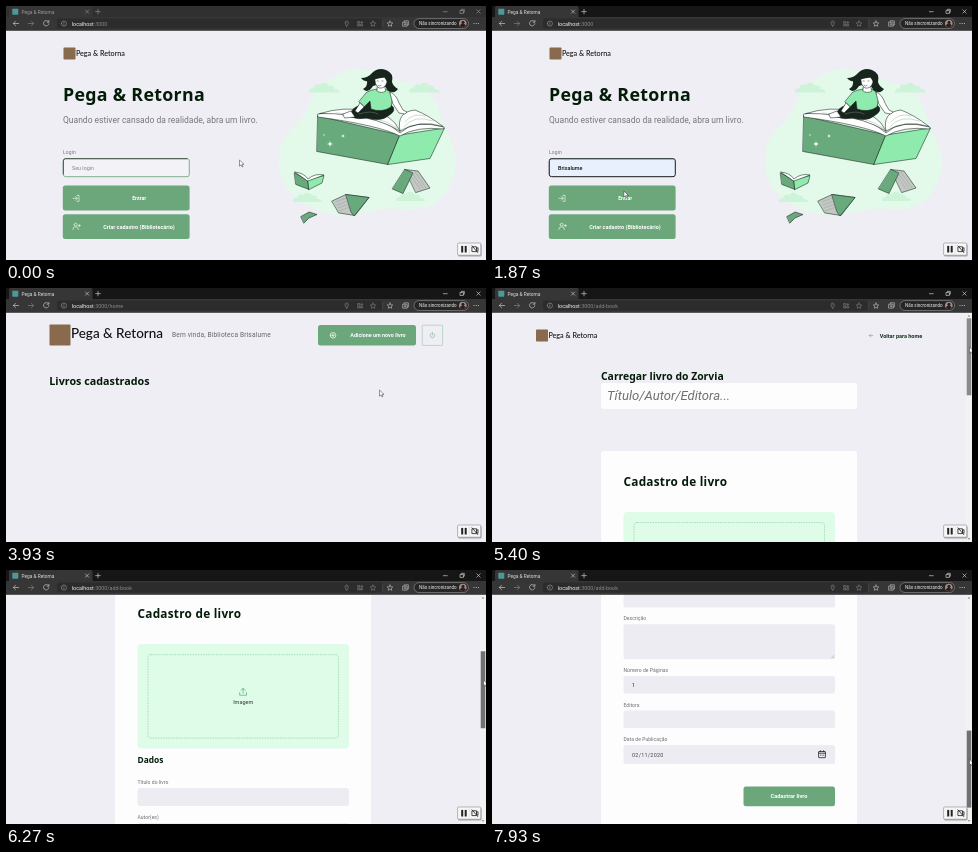
Write an HTML page that moves like this. It is 480x254 px and loops after 8000 ms.

```html
<!DOCTYPE html>
<html lang="pt-BR">
<head>
<meta charset="utf-8">
<title>Pega &amp; Retorna</title>
<style>
  html, body { margin: 0; width: 100%; height: 100%; overflow: hidden; background: #efeef4; }
  svg { display: block; width: 100vw; height: 100vh; }
  text { font-family: Roboto, Arial, sans-serif; white-space: pre; }
  .head { font-family: "Noto Sans", "Open Sans", sans-serif; font-weight: 700; fill: #041b08; }
  .logo { font-family: Lato, sans-serif; font-weight: 500; fill: #101010; }
  .b { font-weight: 700; }
  .ln { fill: none; stroke-linecap: round; stroke-linejoin: round; }
  .ink { stroke: #14231a; stroke-width: .55; stroke-linejoin: round; stroke-linecap: round; }
</style>
</head>
<body>
<svg id="stage" viewBox="0 0 480 254" preserveAspectRatio="none"></svg>
<script>
const GREEN = '#6ba77b', GREY = '#77767f';

const rect = (x, y, w, h, fill, rx = 0, more = '') =>
  `<rect x="${x}" y="${y}" width="${w}" height="${h}" fill="${fill}" rx="${rx}" ${more}/>`;
const text = (x, y, size, str, fill = '#222', more = '') =>
  `<text x="${x}" y="${y}" font-size="${size}" fill="${fill}" ${more}>${str.replace('&', '&amp;')}</text>`;
const head = (x, y, size, str, gap = 0) =>
  `<text class="head" x="${x}" y="${y}" font-size="${size}" letter-spacing="${gap}">${str.replace('&', '&amp;')}</text>`;
const line = (d, color, w = .8) => `<path class="ln" d="${d}" stroke="${color}" stroke-width="${w}"/>`;
const shape = (d, fill, more = 'class="ink"') => `<path d="${d}" fill="${fill}" ${more}/>`;
const flat = (d, fill) => shape(d, fill, '');
const group = (id, body, more = '') => `<g id="${id}" ${more}>${body}</g>`;
const logo = (x, y, box, size, base) =>
  rect(x, y, box, box, '#8a6a4c', .8) +
  `<text class="logo" x="${x + box + .4}" y="${base}" font-size="${size}">Pega &amp; Retorna</text>`;
const button = (x, y, w, h, label, cx, size) =>
  rect(x, y, w, h, GREEN, 2.5) +
  text(cx, y + h / 2 + size * .36, size, label, '#fff', 'class="b" text-anchor="middle"');

// Browser frame
function chrome() {
  const c = '#c4c4c4', dim = '#808080';
  const strip = text(15.5, 7.6, 4.8, 'Pega & Retorna', '#dedede') +
    line('M79.5 4l3.2 3.2m0-3.2l-3.2 3.2M92 3.3v4.6M89.7 5.6h4.6', c, .7) +
    line('M437.4 5.7h3.8M454.4 4.4h3v3h-3zM455.4 4.2v-.9h2.9v2.9h-.8M470.8 3.8l3.4 3.4m0-3.4l-3.4 3.4', '#e6e6e6', .6);
  return rect(0, 0, 480, 11.5, '#161616', 0, 'id="strip"') + rect(3, 0, 83.5, 12, '#363636', 1.5) +
    rect(0, 11, 480, 13.8, '#363636') + rect(51, 12.6, 325, 10, '#2c2c2c', 2) +
    rect(6.3, 2.7, 6, 6, '#4b9a9a', .6) + group('tab', strip) +
    line('M12.6 17.5H7.4m2.2-2.3l-2.3 2.3 2.3 2.3M42.4 15.6a2.7 2.7 0 1 0 .5 2.1M42.9 14.4v1.8h-1.8', c, .7) +
    line('M22.4 17.5h5.2m-2.2-2.3l2.3 2.3-2.3 2.3', dim, .7) +
    line('M55.3 17.6a2.6 2.6 0 1 0 5.2 0a2.6 2.6 0 1 0-5.2 0M57.9 17.3v1.5M57.9 16.1v.1', '#aaa', .5) +
    `<text y="19.5" font-size="5.4" x="65.8" fill="#f1f1f1">localhost<tspan id="path" fill="#8a8a8a"></tspan></text>` +
    line('M340.7 20.3c-2.4-3-2-5.2 0-5.2s2.4 2.2 0 5.2M340.7 16.7v.1', dim, .7) +
    line('M352 15.5h1.7v1.7H352zM352 18.3h1.7V20H352zM354.9 18.3h1.7V20h-1.7zM354.8 16.4h2M355.8 15.4v2', dim, .6) +
    [[367, dim], [384, c]].map(([x, col]) =>
      line(`M${x} 15l.8 1.8 2 .2-1.5 1.3.4 2-1.7-1-1.7 1 .4-2-1.5-1.3 2-.2z`, col, .6)).join('') +
    line('M376.7 14.5v6', '#555', .5) +
    line('M397 16.2h4.2v4h-4.2zM398.2 16v-1.2h4.2V19h-1M399.1 17.2v2M398.1 18.2h2', c, .6) +
    rect(408, 12.6, 54.5, 9.9, '#262626', 5, 'stroke="#aaa" stroke-width=".5"') +
    text(413, 19.1, 4.5, 'Não sincronizando', '#eee') +
    '<circle cx="456.8" cy="17.5" r="3.8" fill="#a58f86"/><circle cx="457" cy="16.4" r="1.6" fill="#2b2020"/>' +
    flat('M453.6 19.6q3.2-4 6.4 0a3.8 3.8 0 0 1-6.4 0z', '#2b2020') +
    [468, 470.2, 472.4].map(x => `<circle cx="${x}" cy="17.5" r=".5" fill="#ddd"/>`).join('');
}

const cloud = (x, y, s) =>
  `<path transform="translate(${x} ${y}) scale(${s})" d="M0 10Q-1 5 5 5Q6-1 13 1Q18-5 24 2Q30 1 30 6Q36 6 36 10z" fill="#cdf4d9"/>`;
const spark = (x, y, r) =>
  flat(`M${x} ${y - r}Q${x} ${y} ${x + r} ${y}Q${x} ${y} ${x} ${y + r}Q${x} ${y} ${x - r} ${y}Q${x} ${y} ${x} ${y - r}`, '#fff');

function art() {
  const mid = '#69aa7d', light = '#8eeaad', black = '#17251d', skin = '#fff', grey = '#c3c8c5';
  return flat('M334 68C354 57 377 69 397 76C424 82 432 96 435 112C441 130 454 145 449 165C443 192 426 206 397 203C370 200 347 214 321 207C289 199 271 177 273 151C275 124 295 120 302 101C308 85 318 75 334 68z', '#e3faea') +
    cloud(303, 78, .85) + cloud(403, 78, .85) + cloud(287, 188, .8) + cloud(390, 187, .8) +
    // large book
    shape('M312 110L394 129L382 158.5L311 145.5z', mid) +
    shape('M394 129L438.5 122L424 152.5L382 158.5z', light) +
    shape('M312 108Q332 104 352 110Q379 113 394 127Q408 113 438 121L437.5 123Q411 120 394 130Q372 119 312 111z', '#fff') +
    shape('M314 107.5Q338 100 362 105Q386 107 394 125Q372 112 344 109.5Q328 107 314 107.5z', '#fff') +
    shape('M394 125Q390 106 409 104Q422 109 437 120.5Q413 113 394 125z', '#fff') +
    line('M330 107Q372 108 393 123M398 121Q408 108 427 115M399 116Q407 106 419 110', '#80a38b', .4) +
    spark(324, 138, 3.4) + spark(337, 130, 2) + spark(318, 129, 1.3) +
    // rider
    shape('M345 111Q343 105 350 101L367 93L385 99Q392 104 382 110Q375 116 361 112Q352 114 345 111z', black) +
    line('M353 108Q365 104 372 108', '#6c8575', .5) +
    shape('M337 108l8-3 4 6-10 1z', skin) +
    shape('M361 86Q371 81 383 84L387 91L385 101Q376 107 365 103L364 95L358 101L353 96z', light) +
    shape('M384 86Q390 88 393 97L397 104L401 106L399 108L393 107L387 98z', skin) +
    shape('M354 97L349 105L352 107L358 101z', skin) +
    shape('M372 79h6l2 6q-5 3-9 0z', skin) +
    flat('M355 72Q362 72 366 67Q372 61 380 64Q388 67 386 76Q387 80 392 83Q389 88 382 85L377 77L367 80Q362 88 357 83Q362 80 361 75Q358 76 355 72z', black) +
    shape('M369 70Q374 73 380 71L381 76Q379 83 373 82Q368 79 369 70z', skin) +
    flat('M367 73Q367 65 376 65Q384 67 383 76Q379 74 378 70Q373 74 367 73z', black) +
    line('M372 79.5q1.5 1 3 0M371 75h1.3M375.8 75h1.3', black, .45) +
    // small books
    shape('M288.5 167L302 174L303 183.5L290 178.5z', mid) +
    shape('M302 174L318 169.5L316 177L303 183.5z', light) +
    shape('M289 166Q298 167 302 173Q309 167 318 169L302 175z', '#fff') +
    shape('M399 163.5L412 165L424 182L410 186.5z', grey) +
    shape('M399 163.5L407 167L397 187.5L386.5 183z', mid) +
    line('M403 167l11 16M406 167l11 15M409 166l11 16', '#8d9690', .4) +
    shape('M326 195L340 188.5L363 191.5L349 209.5L333 207z', grey) +
    shape('M340 188.5L363 191.5L348 210L345 206z', mid) +
    line('M330 196l10-4M331 199l11-4M332 202l11-4M333 205l11-4', '#8d9690', .4) +
    shape('M295 210.5L303 206L311 208.5L303 212L298 217z', mid);
}

function loginPage() {
  return logo(57.5, 41.5, 12, 7.2, 50) +
    head(57, 95, 17.8, 'Pega & Retorna', .3) +
    text(57, 117.3, 8.5, 'Quando estiver cansado da realidade, abra um livro.', GREY) +
    text(57, 148.4, 5, 'Login', GREY, 'letter-spacing=".1"') +
    rect(57.3, 152.7, 126, 18, '#f3f2f7', 2.3, 'id="field" stroke-width="1"') +
    line('M57.3 168V155q0-2.3 2.3-2.3H181', '#45524b', 1) +
    '<text id="value" x="66" y="163.8" font-size="5.4"></text>' +
    button(56.8, 179.6, 126.8, 24.8, 'Entrar', 133.2, 5.2) +
    button(56.8, 208.2, 126.8, 24.8, 'Criar cadastro (Bibliotecário)', 133, 5.5) +
    line('M67 192.3h4.3m-1.7-1.8l1.8 1.8-1.8 1.8M71 189.3h2v6h-2', '#fff', .6) +
    line('M66.8 223.5q0-2.8 2.8-2.8t2.8 2.8M68.1 218.7a1.5 1.5 0 1 0 3 0a1.5 1.5 0 1 0-3 0M72.2 219.6h2.2M73.3 218.5v2.2', '#fff', .6) +
    art();
}

function homePage() {
  return logo(43.5, 36.5, 21, 13.5, 50.3) +
    text(166, 49.3, 6.6, 'Bem vinda, Biblioteca Brisalume', '#67666e', 'letter-spacing=".16"') +
    button(312, 37, 98, 20.6, 'Adicione um novo livro', 372, 5.4) +
    line('M324.2 47.3a2.8 2.8 0 1 0 5.6 0a2.8 2.8 0 1 0-5.6 0M327 46v2.6M325.7 47.3h2.6', '#fff', .7) +
    rect(416.2, 37.2, 20.4, 20.2, 'none', .5, 'stroke="#9cc4a9" stroke-width=".6"') +
    line('M424.9 45.6a2.3 2.3 0 1 0 3 0M426.4 44.3v2.7', '#76b188', .6) +
    head(43.3, 97, 10.75, 'Livros cadastrados');
}

function addPage() {
  const field = (label, y, h) =>
    text(131.5, y - 4, 5, label, '#6c6b74', 'letter-spacing=".05"') + rect(131.5, y, 211.5, h, '#edecf2', 2.5);
  return logo(44, 41.5, 12, 7.2, 50) +
    line('M380.8 47.6h-3.5m1.4-1.4l-1.4 1.4 1.4 1.4', '#7aa086', .6) +
    text(387.7, 49.5, 5.5, 'Voltar para home', '#12301a', 'class="b"') +
    head(109, 92, 10.4, 'Carregar livro do Zorvia') +
    rect(109, 95, 256, 26, '#fdfdfe', 2.5) +
    text(115, 112.3, 13.1, 'Título/Autor/Editora...', '#707074', 'font-style="italic"') +
    rect(109, 163, 256, 500, '#fdfdfe', 3) +
    head(131.5, 197.6, 11.8, 'Cadastro de livro', .25) +
    rect(131.5, 224, 211.5, 104.5, '#defce7', 4) +
    rect(142, 234.5, 190.5, 83.5, 'none', 3, 'stroke="#86cda0" stroke-width=".6" stroke-dasharray="1.6 1"') +
    line('M233.7 272.5v2.6h6.8v-2.6M237.1 273v-4.8m-2 2l2-2 2 2', '#4fae72', .7) +
    text(237.2, 284, 5.5, 'Imagem', '#333', 'text-anchor="middle"') +
    head(131.5, 343, 8.4, 'Dados') +
    field('Título do livro', 368, 18) + field('Autor(es)', 403, 17.6) +
    field('Descrição', 437.2, 35) + line('M339.5 471l2.5-2.5M341 471l1-1', '#888', .4) +
    field('Número de Páginas', 489, 17.6) + text(140, 499.8, 5.4, '1') +
    field('Editora', 523.5, 17.6) + field('Data de Publicação', 558, 19) +
    text(140, 569.6, 5.4, '02/11/2020', '#444', 'letter-spacing=".3"') +
    rect(326.6, 564.5, 6.8, 6.2, 'none', .4, 'stroke="#222" stroke-width=".8"') +
    line('M326.6 566.2h6.8M328.4 563.7v1M331.6 563.7v1M328.4 568.2h.1M330 568.2h.1M331.6 568.2h.1', '#222') +
    button(251.5, 599.6, 91.5, 19.6, 'Cadastrar livro', 297, 5.6);
}

const scrollbar = () => rect(474, 24.8, 6, 229.2, '#f2f2f3') +
  flat('M475.7 28.6l1.3-1.6 1.3 1.6zM475.7 250.2l1.3 1.6 1.3-1.6z', '#777') +
  rect(474.7, 30.3, 4.6, 77, '#8a8a8c', 0, 'id="thumb"');

const recorder = () => rect(452, 238, 23.6, 12.4, '#777', 1.5, 'opacity=".6"') +
  rect(451.6, 237, 23.2, 12.2, '#f7f7f7', 1, 'stroke="#888" stroke-width=".6"') +
  rect(455.2, 239.9, 2, 6.6, '#222') + rect(458.7, 239.9, 2, 6.6, '#222') +
  line('M463.3 238.3v9.6', '#ccc', .4) +
  line('M466.3 240.8h4.2v4.8h-4.2zM470.5 242.6l1.5-1v3.8l-1.5-1M466 239.8l5.8 6.8', '#333', .9);

const $ = id => document.getElementById(id);
$('stage').innerHTML = rect(0, 0, 480, 254, '#efeef4') +
  group('login', loginPage()) + group('home', homePage()) +
  group('add', group('sheet', addPage()) + scrollbar()) + chrome() + recorder() +
  group('arrow', shape('M0 0V6.2L1.5 4.8L2.5 7L3.5 6.5L2.5 4.4H4.5z', '#fff', 'stroke="#333" stroke-width=".5"')) +
  group('beam', line('M-1 0H1M0 0V6M-1 6H1', '#333', .6));

// [time, x, y]
const mouse = [
  [0, 233.5, 154], [70, 233.5, 154], [470, 150, 159], [870, 150, 159], [1330, 120, 184],
  [1470, 120, 184], [1870, 132, 185], [2200, 135, 190], [2930, 135, 190], [3065, 373.5, 102],
  [3935, 373.5, 102], [4330, 371, 47], [4750, 371, 47], [5400, 477.5, 59]
];
// [time, scroll]
const scroll = [
  [5530, 0], [6000, 145], [6130, 145], [6270, 150], [6670, 214], [6800, 214],
  [7070, 267], [7470, 345], [7670, 345], [7930, 383]
];
const RATIO = 2.94, STEP = 1000 / 15, LOOP = 8000;

function at(table, t) {
  const i = table.findIndex(r => r[0] > t);
  if (i === 0) return table[0].slice(1);
  if (i < 0) return table[table.length - 1].slice(1);
  const a = table[i - 1], b = table[i];
  const k = (t - a[0]) / (b[0] - a[0]);
  return a.slice(1).map((v, n) => v + (b[n + 1] - v) * k);
}

const set = (id, name, value) => $(id).setAttribute(name, value);
const show = (id, on) => set(id, 'visibility', on ? 'visible' : 'hidden');

function draw(t) {
  const page = t < 2390 ? 'login' : t < 4590 ? 'home' : 'add';
  for (const p of ['login', 'home', 'add']) set(p, 'display', p === page ? 'inline' : 'none');
  $('path').textContent = ':3000' + { login: '', home: '/home', add: '/add-book' }[page];

  // The window is inactive until the field is clicked
  const filled = t >= 1190, focus = t >= 660;
  set('strip', 'fill', focus ? '#161616' : '#303030');
  set('tab', 'opacity', focus ? 1 : .6);
  set('field', 'fill', filled ? '#e8f0fe' : '#f3f2f7');
  set('field', 'stroke', focus ? '#161b18' : '#7fb08f');
  $('value').textContent = filled ? 'Brisalume' : 'Seu login';
  set('value', 'fill', filled ? '#111' : '#85848c');
  set('value', 'font-weight', filled ? 500 : 400);

  const [y] = at(scroll, t);
  set('sheet', 'transform', `translate(0 ${-y})`);
  set('thumb', 'transform', `translate(0 ${y / RATIO})`);
  set('thumb', 'fill', t >= 5530 ? '#717173' : '#8a8a8c');

  const [mx, my] = at(mouse, t), cy = my + y / RATIO;
  const typing = page === 'login' && mx > 57 && mx < 183 && cy > 153 && cy < 171;
  for (const id of ['arrow', 'beam']) set(id, 'transform', `translate(${mx} ${cy})`);
  show('arrow', !typing);
  show('beam', typing);
}

const start = performance.now();
function tick() {
  const t = (performance.now() - start) % LOOP;
  draw(Math.floor((t + 5) / STEP) * STEP);
  requestAnimationFrame(tick);
}
draw(0);
requestAnimationFrame(tick);
</script>
</body>
</html>
```
